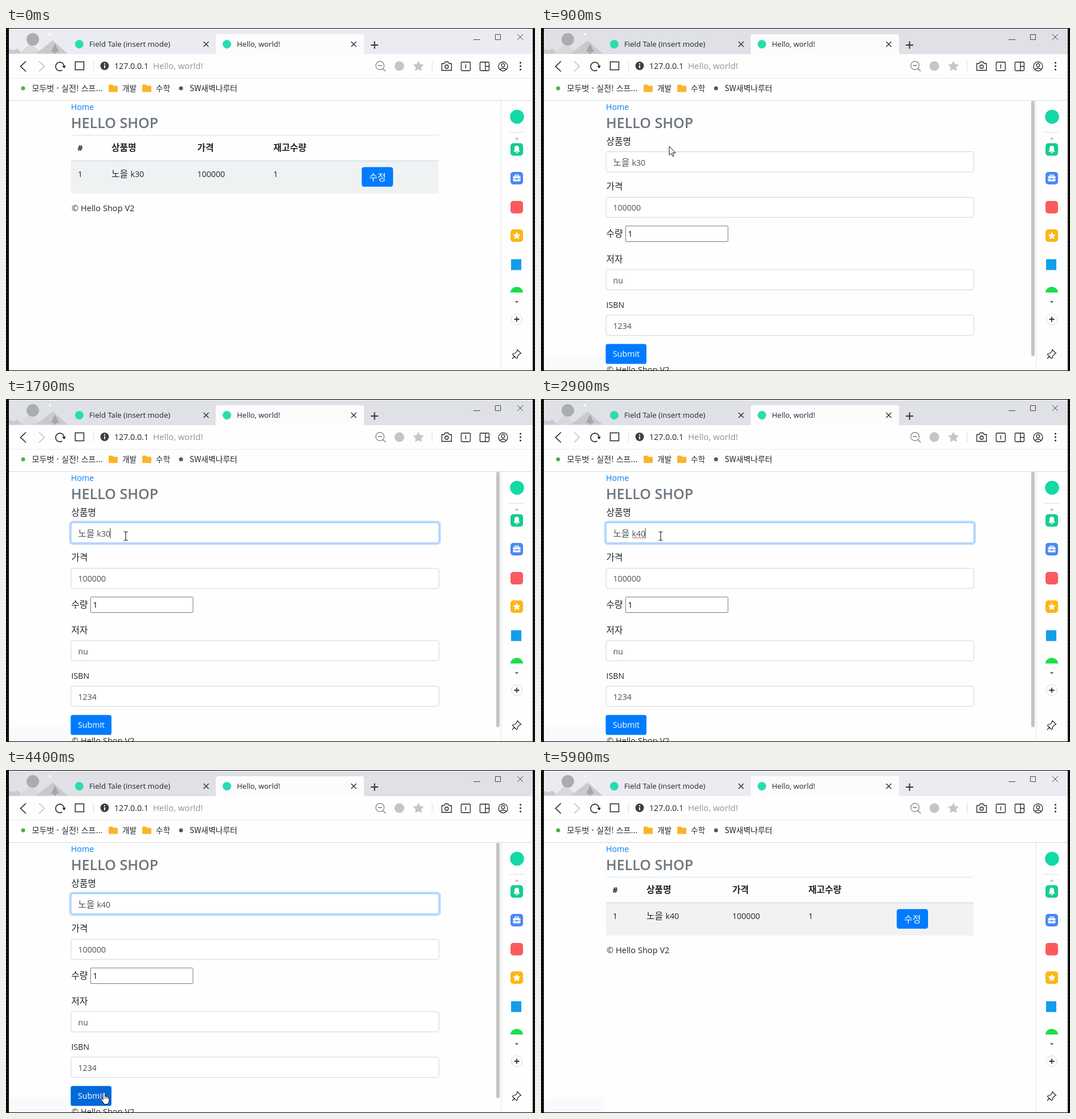
Recreate the animation shown at these times as an HTML page. Size 928x603 px, loop 6 s.

```html
<!DOCTYPE html>
<html lang="ko">
<head>
<meta charset="utf-8">
<title>Hello, world!</title>
<style>
html, body { margin: 0; width: 100%; height: 100%; overflow: hidden; background: #000; }
svg { display: block; width: 928px; height: 603px; }
text { font-family: "Open Sans", "Noto Sans", "Noto Sans CJK KR", sans-serif; white-space: pre; }
.ko { font-family: "Noto Sans CJK KR", "Noto Sans CJK", "Noto Sans", sans-serif; }
</style>
</head>
<body>
<svg id="stage" viewBox="0 0 928 603"></svg>
<script>
const LOOP = 6000, STEP = 100;
const INK = '#212529', FIELD = '#495057', BLUE = '#007bff', BLUE_HOVER = '#0069d9', BLUE_FADE = '#62a8fb';

const rect = (x, y, w, h, fill, more = '') =>
  `<rect x="${x}" y="${y}" width="${w}" height="${h}" fill="${fill}" ${more}/>`;
const circle = (x, y, r, fill, more = '') =>
  `<circle cx="${x}" cy="${y}" r="${r}" fill="${fill}" ${more}/>`;
const line = (d, color = '#222', width = 1.3, more = '') =>
  `<path d="${d}" fill="none" stroke="${color}" stroke-width="${width}" ${more}/>`;
const shape = (d, fill, more = '') => `<path d="${d}" fill="${fill}" ${more}/>`;
const text = (x, y, str, size = 14.2, fill = INK, more = '') =>
  `<text x="${x}" y="${y}" font-size="${size}" fill="${fill}" ${more}>${str}</text>`;
const hangul = (x, y, str, size = 15.8, fill = INK, more = '') =>
  text(x, y, str, size, fill, 'class="ko" ' + more);
const group = (id, body, more = '') => `<g id="${id}" ${more}>${body}</g>`;
const cross = (x, y, r, color, width) =>
  line(`M${x - r} ${y - r}l${2 * r} ${2 * r}m0 ${-2 * r}l${-2 * r} ${2 * r}`, color, width);
const plus = (x, y, r, color, width) =>
  line(`M${x - r} ${y}h${2 * r}M${x} ${y - r}v${2 * r}`, color, width);
const tile = (y, fill) => rect(885, y, 22, 22, fill, 'rx="5"');

function star(x, y, r, fill) {
  const points = Array.from({ length: 10 }, (_, i) => {
    const a = i * Math.PI / 5 - Math.PI / 2, d = i % 2 ? r * 0.5 : r;
    return `${(x + d * Math.cos(a)).toFixed(1)} ${(y + d * Math.sin(a)).toFixed(1)}`;
  });
  return shape(`M${points.join('L')}Z`, fill, `stroke="${fill}" stroke-linejoin="round"`);
}

function titleBar() {
  return rect(5, 1, 919, 45, '#ebecf2', 'id="bar"')
    + shape('M5 45V37L14 39 20 36 29 45Z', '#c9cace')
    + shape('M24 45L43 26 62 45Z', '#d8d9dd')
    + shape('M52 45L82 22 108 45Z', '#c9cace')
    + shape('M86 27L79 42H84V45H88V42H93Z', '#a5a7ab')
    + circle(47, 20, 11, '#aaacb0') + circle(77, 11, 2, '#fff')
    + circle(128.5, 28.5, 7.5, '#2bdcb0')
    + text(146, 32.5, 'Field Tale (insert mode)', 13.2)
    + cross(351, 28.5, 4.5, '#333', 1.5)
    + shape('M368 46V15q0-4 4-4H624q4 0 4 4V46Z', '#fcfcfd')
    + circle(387.5, 28.5, 7.5, '#2bdcb0', 'id="favicon"')
    + line('M387.5 22a6.5 6.5 0 1 1-6.5 6.5', '#4b86f3', 2, 'id="spinner"')
    + text(405, 32.5, 'Hello, world!', 13)
    + cross(610, 28.5, 4.5, '#333', 1.5) + plus(646.5, 30, 6.5, '#333', 2)
    + line('M820 20.5h12M858.5 11.5h9v9h-9z', '#444', 1)
    + cross(902, 16, 5, '#444', 1);
}

function toolbar() {
  const dots = [61, 67, 73].map(y => circle(902.5, y, 1.5, '#222')).join('');
  return rect(5, 46, 919, 82, '#fefefe')
    + line('M35 58.5L25.5 67.5 35 76.5', '#222', 1.6)
    + line('M58 58.5L67.5 67.5 58 76.5', '#bbb', 1.4)
    + group('reload', line('M98.5 74A7.5 7.5 0 1 1 102 67.5', '#222', 1.6) + shape('M98.5 66.5h6.5l-3 4.5z', '#222'))
    + group('stop', cross(95, 67, 6, '#222', 1.6))
    + line('M121.5 59.5h15v14h-15z', '#222', 1.5)
    + line('M153.5 58v18', '#ddd', 1)
    + circle(173, 66.5, 7.5, '#3c4043') + line('M173 65.5v5M173 62v2', '#fff', 2)
    + text(190, 72, '127.0.0.1') + text(258, 72, 'Hello, world!', 15, '#909296')
    + circle(656, 66, 7.3, 'none', 'stroke="#777" stroke-width="1.2"')
    + line('M652.5 66h7M661 71.5l5 4.5', '#777')
    + circle(690, 67, 8.5, '#c4c5c7') + star(723.5, 67.5, 9, '#c4c5c7')
    + line('M747.5 58v18', '#ddd', 1)
    + line('M764.5 62.5h4l2-3h5l2 3h4v12h-17z') + circle(773, 68, 3, 'none', 'stroke="#222" stroke-width="1.3"')
    + rect(798.5, 60, 16, 15, 'none', 'rx="1.5" stroke="#222" stroke-width="1.3"') + line('M806.5 64v7')
    + rect(831.5, 60, 16, 15, 'none', 'rx="1.5" stroke="#222" stroke-width="1.3"') + line('M841 60v15M841 67.5h6')
    + circle(872, 67.5, 8, 'none', 'stroke="#222" stroke-width="1.3"')
    + circle(872, 65.5, 2.8, 'none', 'stroke="#222" stroke-width="1.2"') + line('M866.5 73q5.5-5 11 0', '#222', 1.2)
    + dots
    + line('M5 88.5h919', '#ececef', 1);
}

function bookmarks() {
  const folder = x => shape(`M${x} 101q0-1.5 1.5-1.5h5l2 2h6q1.5 0 1.5 1.5v8q0 1.5-1.5 1.5h-13q-1.5 0-1.5-1.5z`, '#fbb42a');
  return circle(30, 106, 3.5, '#4caf50') + hangul(45.5, 110.5, '모두벗 - 실전! 스프...', 14.1)
    + folder(180) + hangul(204, 110.5, '개발', 13.6)
    + folder(239) + hangul(263, 110.5, '수학', 13.6)
    + circle(307, 106, 3.5, '#55585c') + hangul(322, 110.5, 'SW새벽나루터', 13.8);
}

function sidebar() {
  return line('M868.5 128V602', '#e1e2e4', 1)
    + circle(896.5, 156, 12.3, '#13d9a5')
    + line('M883 183.5h25', '#ddd', 1)
    + shape('M892.5 196h7l-3.5-4z', '#bbb')
    + tile(202.5, '#15cd92')
    + shape('M890 217.5l2-2.5v-4a4 4 0 0 1 8 0v4l2 2.5z', '#fff') + rect(894, 218.5, 4, 1.5, '#fff')
    + tile(253, '#4c87f4')
    + line('M893 261v-2.5h6v2.5', '#fff', 1.5) + rect(889.5, 260.5, 13, 9, '#fff', 'rx="1"')
    + line('M889.5 265h13', '#4c87f4', 1) + rect(894.5, 264, 3, 2.5, '#4c87f4')
    + tile(304, '#fb5b5e')
    + tile(354, '#fdb714') + star(896, 365.5, 6, '#fff')
    + rect(886, 406.5, 18, 19, '#139dec')
    + shape('M885 465a11 10 0 0 1 22 0z', '#19df48')
    + shape('M892.5 480h7l-3.5 4z', '#777')
    + circle(896, 512, 9.5, '#fff', 'stroke="#d8d8d8"') + plus(896, 512, 4.5, '#333', 1.8)
    + line('M897 565.5l6.5 6.5-2.5 1-3.5 3.5v3l-2 1.5-7-7 1.5-2h3l3.5-3.5zM892 577l-4 4.5', '#222', 1.2);
}

function listPage() {
  const head = [[185, '상품명'], [335.5, '가격'], [469, '재고수량']]
    .map(([x, str]) => hangul(x, 216, str, 15.8, INK, 'font-weight="700"')).join('');
  return rect(114, 233, 645, 58, '#f2f2f2', 'id="row"')
    + line('M114 188.5h645', '#dee2e6', 1) + line('M114 233.5h645', '#dee2e6', 2)
    + text(125.5, 216, '#', 14.2, INK, 'font-weight="700"') + head
    + text(126, 261.5, '1') + hangul(185, 261.5, '노을')
    + text(218.5, 261.5, '', 14.2, INK, 'id="itemModel"')
    + text(335.5, 261.5, '100000') + text(469, 261.5, '1')
    + rect(624.5, 245, 54, 33.5, BLUE, `rx="3.6" stroke="${BLUE}" id="editBox"`)
    + hangul(637, 267.5, '수정', 16, '#fff', 'id="editText"')
    + text(115, 322, '© Hello Shop V2', 14.6);
}

function formPage() {
  const field = (y, value) => rect(114, y, 645.5, 35.5, '#fff', 'rx="3.6" stroke="#ced4da"')
    + text(126.5, y + 23.8, value, 14.2, FIELD);
  return hangul(114.5, 204.5, '상품명') + field(217.5, '')
    + group('ring', rect(112, 215.5, 649.5, 39.5, 'none', 'rx="5" stroke="#bfdeff" stroke-width="3"')
      + rect(114, 217.5, 645.5, 35.5, 'none', 'rx="3.6" stroke="#80bdff"'))
    + hangul(126.5, 242, '노을', 15.8, FIELD)
    + text(159.5, 241.5, '', 14.2, FIELD, 'id="model"')
    + line('', '#e8362f', 1, 'id="squiggle"')
    + rect(0, 227, 1, 18, '#333', 'id="caret"')
    + hangul(114.5, 284, '가격') + field(297.5, '100000')
    + hangul(114.5, 367, '수량')
    + rect(148.5, 348, 179.5, 27.5, '#fff', 'rx="1.5" stroke="#767676"') + text(152.5, 367, '1', 14.2, '#000')
    + hangul(114.5, 412, '저자') + field(424.8, 'nu')
    + text(114.5, 492, 'ISBN', 14.2) + field(504.8, '1234')
    + rect(113.5, 555.5, 71.5, 35, BLUE, 'rx="3.6" id="submit"') + text(126, 578, 'Submit', 14.2, '#fff')
    + text(115, 606, '© Hello Shop V2', 14.6)
    + rect(860, 128, 6, 449, '#c4c4c4', 'rx="3"');
}

const cursors = {
  arrow: shape('M0 0V15.5L3.6 12.3 6 17.7 8.3 16.7 6 11.4H11Z', '#fff', 'stroke="#111"'),
  beam: line('M-3.5-7.5h2.5l1 1 1-1h2.5M0-6.5V6.5M-3.5 7.5h2.5l1-1 1 1h2.5', '#222', 1.2),
  hand: shape('M-1.7 1.5q0-2 1.7-2t1.7 2V7q1-.8 2.2-.3l.5.8q1.3-.6 2.3.5l.3.7q2-.2 2 2V14q0 3-2 5v1.5H-.5V19L-5.3 12.5q-.5-2 1.3-2l2.3 2z', '#fff', 'stroke="#111" stroke-linejoin="round"')
    + line('M1.7 7v4M4.4 8v3M7 9v2', '#111', 0.8)
};

document.getElementById('stage').innerHTML =
  line('M2 0V603M926 0V603', '#2c2c2c', 1.5, 'stroke-dasharray="3 3"')
  + `<clipPath id="window">${rect(5, 1, 919, 601, '#fff')}</clipPath><g clip-path="url(#window)">`
  + rect(5, 1, 919, 601, '#fefefe') + titleBar() + toolbar() + bookmarks() + sidebar()
  + line('M5 127.5h919', '#d8dadd', 1.2)
  + rect(6, 576, 104, 26, '#f9fafc', 'id="trace"')
  + text(114, 144, 'Home', 14.2, BLUE)
  + text(114, 176, 'HELLO SHOP', 25, '#6c757d', 'font-weight="600"')
  + group('list', listPage()) + group('form', formPage())
  + group('status', shape('M5 576H179q4 0 4 4V603H5Z', '#dee1e6') + text(12, 593, '127.0.0.1:8080/items/1/edit', 12.7, '#5f6368'))
  + Object.entries(cursors).map(([id, body]) => group(id, body)).join('')
  + '</g>';

// time, cursor kind, x, y
const pointer = [
  [0], [100, 'arrow', 846, 142], [200, 'arrow', 790, 190], [300, 'arrow', 722, 232],
  [400, 'hand', 668, 256], [500, 'hand', 652, 258], [600, 'hand', 648, 257],
  [900, 'arrow', 225, 208], [1000, 'arrow', 174, 196], [1100, 'arrow', 154, 273],
  [1200, 'arrow', 169, 273], [1300, 'beam', 196, 249], [1400, 'beam', 210, 241],
  [3400, 'beam', 420, 243], [3500, 'beam', 742, 312], [3600, 'beam', 222, 450],
  [3700, 'arrow', 282, 509], [3800, 'arrow', 299, 572], [3900, 'arrow', 212, 574],
  [4000, 'hand', 161, 570], [4100, 'hand', 167, 568], [4200, 'hand', 172, 567],
  [4700, 'arrow', 222, 560], [4800, 'arrow', 452, 430], [4900, 'arrow', 720, 268],
  [5000, 'arrow', 892, 151], [5200]
];
// time, model name, caret x, squiggle end
const typing = [
  [0, 'k30', 0, 0], [1500, 'k30', 182.5, 0], [2000, 'k30', 0, 0], [2200, 'k30', 174.5, 0],
  [2400, 'k0', 166.5, 175], [2700, 'k40', 174.5, 175], [2900, 'k40', 182.5, 183], [3400, 'k40', 0, 0]
];

const $ = id => document.getElementById(id);
const at = (table, t) => table.findLast(row => row[0] <= t);
const within = (t, from, to) => t >= from && t < to;
const show = (id, on) => $(id).setAttribute('display', on ? 'inline' : 'none');
const set = (id, name, value) => $(id).setAttribute(name, value);

function squiggle(end) {
  let d = 'M160 243';
  for (let x = 162, i = 0; x <= end; x += 2, i++) d += `L${x} ${i % 2 ? 243 : 245}`;
  return end ? d : '';
}

function render(t) {
  const onForm = within(t, 900, 4700);
  const loading = within(t, 800, 900) || within(t, 4500, 4700);
  const fading = within(t, 4700, 4800);
  const editColor = within(t, 400, 900) ? BLUE_HOVER : BLUE;
  const [, model, caretX, squiggleEnd] = at(typing, t);

  set('bar', 'fill', within(t, 700, 5900) ? '#dfe1e6' : '#ebecf2');
  show('favicon', !loading);
  show('spinner', loading);
  set('spinner', 'transform', `rotate(${t * 0.9} 387.5 28.5)`);
  show('reload', !loading);
  show('stop', loading);

  show('list', !onForm);
  show('form', onForm);
  show('trace', t >= 900);
  set('row', 'fill', t < 900 ? '#eff2f3' : '#f2f2f2');
  $('itemModel').textContent = model;
  set('editBox', 'fill', fading ? BLUE_FADE : editColor);
  set('editBox', 'stroke', fading ? '#4a9cf6' : editColor);
  set('editText', 'fill', fading ? '#98a8d2' : '#fff');
  show('status', within(t, 600, 900));
  set('status', 'opacity', t < 700 ? 0.4 : 1);

  $('model').textContent = model;
  show('caret', caretX);
  set('caret', 'x', caretX);
  set('squiggle', 'd', squiggle(squiggleEnd));
  set('ring', 'opacity', Math.max(0, Math.min(1, (t - 1400) / 300)));
  set('submit', 'fill', t >= 4000 ? BLUE_HOVER : BLUE);

  const [, kind, x, y] = at(pointer, t);
  for (const id in cursors) show(id, id === kind);
  if (kind) set(kind, 'transform', `translate(${x} ${y})`);
}

const start = performance.now();
function tick() {
  const t = (performance.now() - start) % LOOP;
  render(Math.floor(t / STEP) * STEP);
  requestAnimationFrame(tick);
}
tick();
</script>
</body>
</html>
```
